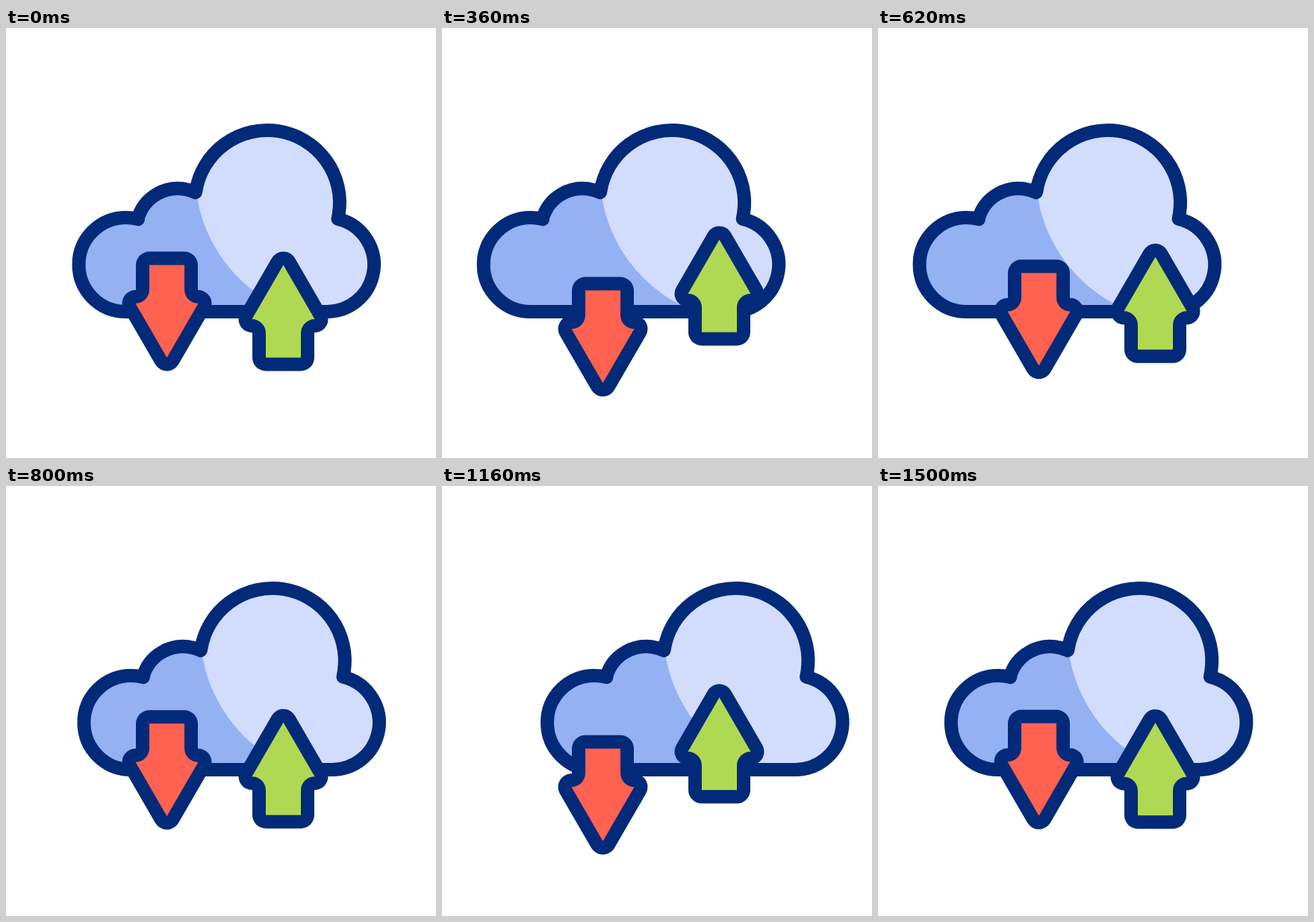
Write an HTML page with a canvas that moves like this. It is 576 px wide and 576 px high and loops after 1.52 s.

```html
<!DOCTYPE html>
<html lang="en">
<head>
<meta charset="utf-8">
<title>Cloud transfer</title>
<style>
  html, body { margin: 0; width: 100%; height: 100%; overflow: hidden; background: #fff; }
  canvas { display: block; width: 576px; height: 576px; }
</style>
</head>
<body>
<canvas id="stage" width="576" height="576"></canvas>
<script>
const ctx = document.getElementById("stage").getContext("2d");
const LOOP = 1520, STEP = 20;
const NAVY = "#032a78", MID = "#93b1f3", LIGHT = "#d2ddfd", RED = "#ff6250", GREEN = "#b0d953";

// Cloud sway: [time in ms, horizontal offset]
const SWAY = [[0, 0], [520, -55.5], [1030, 54.5], [1510, 0], [LOOP, 0]];

const softEase = p => 0.76 * p * p * (3 - 2 * p) + 0.24 * p;

function swayAt(t) {
  const i = SWAY.findIndex(key => t < key[0]);
  const [t0, x0] = SWAY[i - 1], [t1, x1] = SWAY[i];
  return x0 + (x1 - x0) * softEase((t - t0) / (t1 - t0));
}

const liftAt = t => 34.4 * (1 - Math.cos(4 * Math.PI * (t - 3) / LOOP)) / 2;

const cloud = new Path2D();
cloud.arc(160.5, 317, 63, Math.PI / 2, 2 * Math.PI - 1.307);
cloud.arc(230, 270.5, 55.5, 3.409, 5.156);
cloud.arc(350, 234, 97, 3.297, 2 * Math.PI + 0.22);
cloud.arc(430, 317, 63, -1.338, Math.PI / 2);
cloud.closePath();

const glow = new Path2D();
glow.arc(451.4, 194.6, 198, 0, 2 * Math.PI);

// Downward arrow, centred on x = 0
const arrow = new Path2D();
arrow.moveTo(-23.5, 317.5);
arrow.lineTo(23.5, 317.5);
arrow.arc(42, 350.5, 18.5, Math.PI, Math.PI / 2, true);
arrow.lineTo(0, 441.5);
arrow.lineTo(-42, 369);
arrow.arc(-42, 350.5, 18.5, Math.PI / 2, 0, true);
arrow.closePath();

function drawCloud(x) {
  ctx.save();
  ctx.translate(x, 0);
  ctx.fillStyle = MID;
  ctx.fill(cloud);
  ctx.save();
  ctx.clip(cloud);
  ctx.fillStyle = LIGHT;
  ctx.fill(glow);
  ctx.restore();
  ctx.lineWidth = 18;
  ctx.stroke(cloud);
  ctx.restore();
}

function drawArrow(x, y, flip, color) {
  ctx.save();
  ctx.translate(x, y);
  ctx.scale(1, flip);
  ctx.lineWidth = 36;
  ctx.stroke(arrow);
  ctx.fillStyle = color;
  ctx.fill(arrow);
  ctx.restore();
}

function draw(t) {
  ctx.fillStyle = "#fff";
  ctx.fillRect(0, 0, 576, 576);
  ctx.strokeStyle = NAVY;
  ctx.lineJoin = "round";
  const lift = liftAt(t);
  drawCloud(swayAt(t));
  drawArrow(215.5, lift, 1, RED);
  drawArrow(371.5, 759 - lift, -1, GREEN);
}

const start = performance.now();
function tick() {
  const t = (performance.now() - start) % LOOP;
  draw(Math.floor(t / STEP) * STEP);
  requestAnimationFrame(tick);
}
tick();
</script>
</body>
</html>
```
